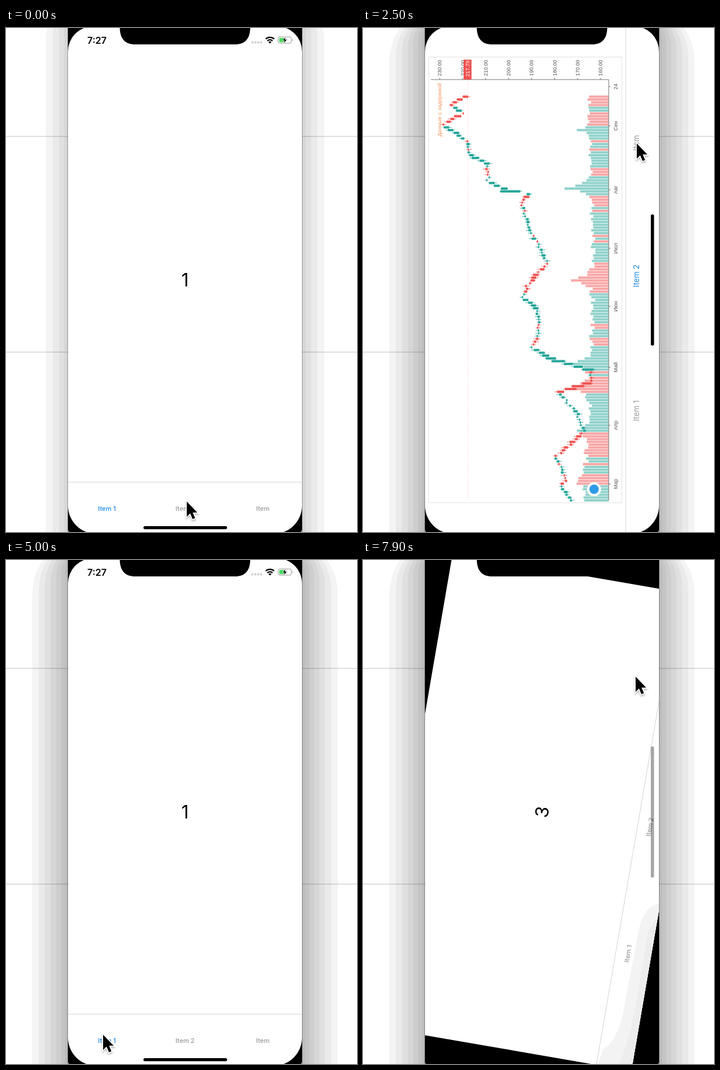
Animation, 600 px wide and 860 px high, one loop 8 s. Source, as an HTML page:

```html
<!DOCTYPE html>
<html lang="en">
<head>
<meta charset="utf-8">
<title>Tab bar rotation</title>
<style>
  html, body { margin: 0; width: 100%; height: 100%; overflow: hidden; background: #fff; }
  svg { display: block; width: 600px; height: 860px; }
  text { font-family: Inter, Roboto, sans-serif; }
  #chart text { font: 9px "Liberation Sans", Arial, sans-serif; fill: #555; }
  #chart .late { font-size: 9.5px; fill: #f0985e; }
  #chart #price { fill: #fff; }
</style>
</head>
<body>
<svg viewBox="0 0 600 860">
  <defs>
    <clipPath id="window"><rect x="106" y="-10" width="400" height="871" rx="5"/></clipPath>
    <filter id="soft" x="-50%" y="-50%" width="200%" height="200%">
      <feDropShadow dx="0" dy="2" stdDeviation="1.6" flood-opacity=".35"/>
    </filter>
  </defs>
  <path d="M0 185H600M0 553H600" stroke="#d6d6d6" stroke-width="1.6"/>
  <g id="dim"></g>
  <g id="deep"></g>
  <path d="M105.5 0V860M506.5 0V860" stroke="#000" stroke-opacity=".3"/>
  <g clip-path="url(#window)">
    <rect x="106" y="-10" width="400" height="880"/>
    <g id="view">
      <rect id="page" fill="#fff"/>
      <text id="digit" text-anchor="middle" font-size="31"></text>
      <g id="chart"></g>
      <rect id="barBack" fill="#fff"/>
      <g id="tint">
        <path d="M0-58L28-54Q42-36 85-31L245-28Q284-24 290 0H0Z" fill="#f3f3f3"/>
        <path d="M0-24Q40-14 90-12H240L270 0H0Z" fill="#ededed"/>
      </g>
      <rect id="barLine" height="1" fill="#d4d4d4"/>
      <text class="tab" text-anchor="middle">Item 1</text>
      <text class="tab" text-anchor="middle">Item 2</text>
      <text class="tab" text-anchor="middle">Item</text>
      <g id="status" transform="translate(-106 5)">
        <text x="139" y="26.5" font-size="16" font-weight="600">7:27</text>
        <path d="M421.3 24.5H437" stroke="#cfcfcf" stroke-width="3.8" stroke-linecap="round" stroke-dasharray="0 4.93"/>
        <path d="M444 18.8A10.3 10.3 0 0 1 458.4 18.8M446.8 21.9A6.2 6.2 0 0 1 455.6 21.9" fill="none" stroke="#000" stroke-width="2.3"/>
        <path d="M451.2 26.5L448.6 23.9A3.8 3.8 0 0 1 453.8 23.9Z"/>
        <rect x="465.2" y="15.2" width="22.6" height="10.8" rx="3" fill="none" stroke="#999"/>
        <path d="M489.3 18.8Q491.6 20.6 489.3 22.4Z" fill="#999"/>
        <rect x="467" y="17" width="9" height="7.2" rx="1.4" fill="#4cd964"/>
        <path d="M478.6 14.6L472.6 21.6H476L474.4 26.8L480.6 19.6H477Z" stroke="#fff" stroke-width=".6"/>
      </g>
    </g>
    <path fill-rule="evenodd" d="M106-10H506V870H106ZM149-3A43 43 0 0 0 106 40V815A48 48 0 0 0 154 863H458A48 48 0 0 0 506 815V40A43 43 0 0 0 463-3Z"/>
    <path d="M194.5-10V0C195 18 203 28 221 28H391C409 28 417 18 417.5 0V-10Z"/>
    <rect id="homeTall" x="235" y="850" width="143" height="5.2" rx="2.6"/>
    <rect id="homeWide" x="492" y="318" width="5.5" height="224" rx="2.7"/>
  </g>
  <path id="cursor" d="M0 0V26L5.800 20.300L10 30L14.200 28.200L10.200 18.700H18Z" stroke="#fff" stroke-width="3" paint-order="stroke" filter="url(#soft)"/>
</svg>
<script>
const $ = id => document.getElementById(id);
const LOOP = 8000, STEP = 100;
const SHORT = 400, LONG = 870, INSET = 47;

function set(el, attrs) {
  for (const k in attrs) el.setAttribute(k, attrs[k]);
  return el;
}
function add(parent, tag, attrs, text) {
  const el = set(document.createElementNS('http://www.w3.org/2000/svg', tag), attrs);
  if (text) el.textContent = text;
  return parent.appendChild(el);
}
const clamp = k => Math.min(1, Math.max(0, k));
const mix = (a, b, k) => a + (b - a) * k;
const smooth = k => k * k * (3 - 2 * k);

// Value of column `col` between key points [position, ...values].
function track(rows, pos, col = 1, ease = k => k) {
  const i = rows.findIndex(r => r[0] > pos);
  if (i < 0) return rows[rows.length - 1][col];
  if (!i) return rows[0][col];
  const a = rows[i - 1], b = rows[i];
  return mix(a[col], b[col], ease((pos - a[0]) / (b[0] - a[0])));
}
const latest = (rows, pos) => rows.filter(r => r[0] <= pos).pop();

// Window shadow: translucent rounded boxes that narrow towards the phone
function shadow(group, reach, count, top) {
  for (let i = 0; i < count; i++) {
    const d = reach * Math.pow(1 - i / count, 1.3);
    add(group, 'rect', {
      x: 106 - d, y: -top - d * .3, width: SHORT + 2 * d, height: 1200,
      rx: d + 40, 'fill-opacity': .043
    });
  }
}
shadow($('dim'), 38, 4, 45);
shadow($('deep'), 61, 7, 25);

// Chart: x runs along time, y down from the top of the landscape page
const TEAL = '#26a69a', RED = '#ef5350';
const PRICE = [
  [54, 252], [77, 231], [86, 241], [129, 224], [170, 272], [200, 261], [238, 230], [255, 282],
  [275, 284], [298, 209], [315, 184], [330, 194], [380, 192], [402, 167], [420, 175], [460, 210],
  [515, 179], [564, 164], [578, 180], [581, 144], [598, 108], [628, 106], [645, 76], [670, 69],
  [695, 32], [714, 64], [728, 44], [745, 72]
];
const SPIKES = [[86, 16], [170, 26], [247, 34], [288, 38], [431, 42], [586, 50], [686, 20]];
let seed = 11;
const rand = () => (seed = seed * 16807 % 2147483647) / 2147483647;
const noise = size => (rand() - .5) * size;

function volume(x) {
  const base = 22 + 16 * ((x - 460) / 400) ** 2 + rand() * 10;
  return SPIKES.reduce((sum, [at, size]) => sum + size * Math.exp(-Math.abs(x - at) / 7), base);
}

function drawChart() {
  const g = $('chart');
  const line = (d, color) => add(g, 'path', { d, fill: 'none', stroke: color, 'stroke-width': .9 });
  add(g, 'rect', { id: 'frame', x: 50, y: 6.5, width: 760.5, fill: 'none', stroke: '#e2e2e2' });
  set(line('M54 73H772', '#fbd3d2'), { 'stroke-dasharray': '2 2' });
  const bars = add(g, 'g', { 'fill-opacity': .5 });
  for (let x = 54; x < 747; x += 4.75) {
    const mid = track(PRICE, x) + noise(5);
    const move = track(PRICE, x + 2.4) - track(PRICE, x - 2.4) + noise(7);
    const body = Math.max(2, Math.abs(move) * 1.2);
    const fill = move < 0 ? TEAL : RED;
    const tall = volume(x), above = rand() * 5, below = rand() * 5;
    add(bars, 'rect', { x: x - 2, y: 314 - tall, width: 4, height: tall, fill });
    add(g, 'rect', { x: x - .4, y: mid - body / 2 - above, width: .8, height: body + above + below, fill });
    add(g, 'rect', { x: x - 2, y: mid - body / 2, width: 4, height: body, fill });
  }
  line('M54 314H772V10', '#666');
  for (let i = 0; i < 8; i++) {
    const y = 25 + i * 39.3;
    line(`M772 ${y}h3`, '#666');
    add(g, 'text', { x: 778, y: y + 3.2 }, (230 - i * 10) + '.00');
  }
  const months = { Мар: 82, Апр: 182, Май: 281, Июн: 385, Июл: 484, Авг: 584, Сен: 693, 24: 760 };
  for (const name in months) {
    line(`M${months[name]} 314v3`, '#666');
    add(g, 'text', { x: months[name], y: 328.5, 'text-anchor': 'middle' }, name);
  }
  add(g, 'rect', { x: 772, y: 66, width: 34, height: 13.5, fill: RED });
  add(g, 'text', { id: 'price', x: 777, y: 76 });
  add(g, 'text', { class: 'late', x: 766, y: 27.5, 'text-anchor': 'end' }, 'Данные с задержкой');
  add(g, 'circle', { cx: 73, cy: 289, r: 10, fill: '#2f9ae8', stroke: '#fff', 'stroke-width': 4 });
}
drawChart();

// Timeline, in ms
const TURN_TIME = 200;
const TURNS = [[-900, false], [1380, true], [3006, false], [6380, true], [7859, false]];
const TAPS = [[0, 0], [1100, 1], [2800, 2], [4900, 0], [6200, 1], [7500, 2]];
const MOVES = [
  [1800, 309, 808], [2400, 468, 197], [3300, 468, 197], [4700, 166, 810], [5300, 166, 810],
  [5900, 309, 808], [6400, 309, 808], [6900, 459, 299], [7100, 466, 199]
];
const TAB_X = [[66.5, 212], [200, 442], [333, 669]];
const tabs = [...document.querySelectorAll('.tab')];

function render(t) {
  const [turnStart, wide] = latest(TURNS, t);
  const age = t - turnStart;
  const turned = smooth(clamp(age / TURN_TIME));
  const p = wide ? turned : 1 - turned;
  const tab = latest(TAPS, t)[1];
  const w = mix(SHORT, LONG, p), h = mix(LONG, SHORT, p);
  const show = (id, on) => set($(id), { opacity: +on });

  show('dim', t < 1000);
  show('deep', t >= 1000);
  set($('view'), { transform: `translate(306 430) rotate(${-90 * p}) translate(${-w / 2} ${-h / 2})` });
  set($('page'), { width: w, height: h });
  set($('digit'), { x: w / 2, y: h / 2 + 11 }).textContent = ['1', '', '3'][tab];

  // The web page keeps its portrait scale until the turn is over.
  const scale = p === 1 ? 1 : SHORT / (LONG - 2 * INSET);
  show('chart', tab === 1);
  set($('chart'), { transform: `translate(${INSET * p} ${INSET * (1 - p)}) scale(${scale}) translate(-42 0)` });
  set($('frame'), { height: p === 1 ? 330 : 940 });
  $('price').textContent = t < 5000 ? '217.79' : '217.74';

  const barHeight = mix(90, 57, p), top = h - barHeight;
  set($('barBack'), { y: top, width: w, height: barHeight });
  set($('barLine'), { y: top - .5, width: w });
  set($('tint'), { transform: `translate(0 ${h})`, opacity: +(p > .01 && p < 1) });
  const size = wide ? 13 : 11;
  tabs.forEach((el, i) => set(el, {
    x: mix(...TAB_X[i], p),
    y: h - mix(45, 39, p) + size * .36,
    'font-size': size,
    'font-weight': wide ? 400 : 500,
    fill: i === tab ? '#1c86e0' : '#999'
  }));
  show('status', p < .05);

  const fadeIn = clamp(age / TURN_TIME - 1), fadeOut = clamp(1 - age / 63);
  show('homeTall', wide ? fadeOut : fadeIn);
  show('homeWide', wide ? fadeIn : fadeOut);
  set($('cursor'), { transform: `translate(${track(MOVES, t, 1, smooth)} ${track(MOVES, t, 2, smooth)})` });
}

const start = performance.now();
function tick() {
  const t = (performance.now() - start) % LOOP;
  render(Math.floor((t + .5) / STEP) * STEP % LOOP);
  requestAnimationFrame(tick);
}
tick();
</script>
</body>
</html>
```
